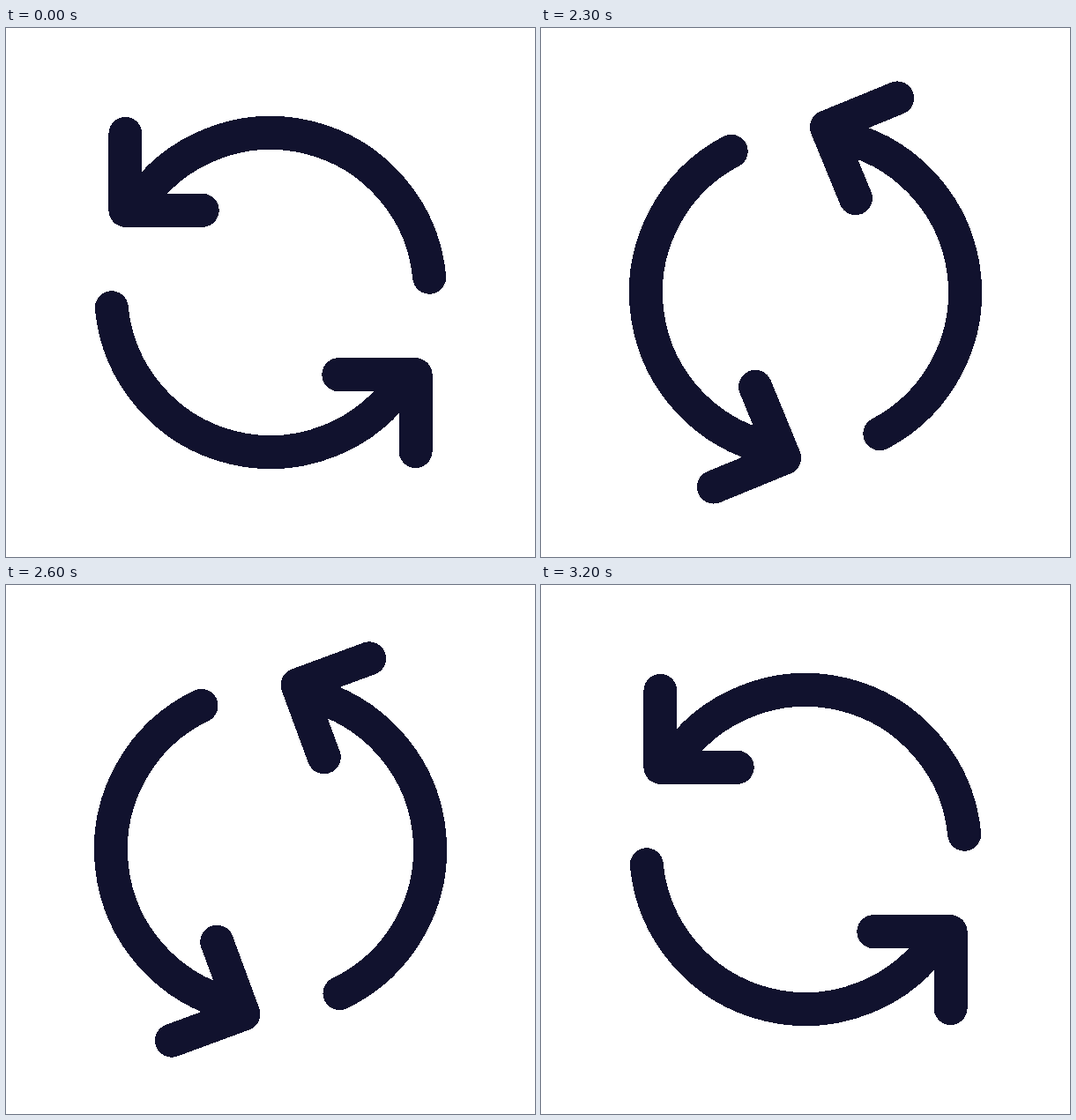
An HTML page that plays this animation: 600x600 px, repeating every 3.26 s.

```html
<!DOCTYPE html>
<html lang="en">
<head>
<meta charset="utf-8">
<title>Refresh arrows</title>
<style>
  html, body { margin: 0; height: 100%; overflow: hidden; background: #fff; }
  svg { display: block; width: 100%; height: 100%; }
</style>
</head>
<body>
<svg viewBox="0 0 600 600" shape-rendering="crispEdges">
  <g id="icon" fill="none" stroke="#11122e" stroke-width="38" stroke-linecap="round" stroke-linejoin="round">
    <path id="arrow" d="M480.2 282.7A181 181 0 0 0 148.2 201.4M135.4 120V206.8H222.7"/>
    <use href="#arrow" transform="rotate(180 300 300)"/>
  </g>
</svg>
<script>
const LOOP = 3260, START = 2016, DURATION = 1184, STEP = 30;
const icon = document.getElementById('icon');

// Cubic Bezier easing with control points (x1, 0) and (x2, 1)
function ease(x, x1 = 0.34, x2 = 0.149) {
  let low = 0, high = 1;
  for (let i = 0; i < 30; i++) {
    const s = (low + high) / 2, r = 1 - s;
    if (3 * s * r * r * x1 + 3 * s * s * r * x2 + s ** 3 < x) low = s;
    else high = s;
  }
  return low * low * (3 - 2 * low);
}

function draw(now) {
  const time = Math.floor((now % LOOP - 2000) / STEP) * STEP + 2000;
  const progress = Math.min(1, Math.max(0, (time - START) / DURATION));
  const turn = progress === 1 ? 0 : -360 * ease(progress);
  icon.setAttribute('transform', `rotate(${turn.toFixed(3)} 300 300)`);
}

const begin = performance.now();
function tick() {
  draw(performance.now() - begin);
  requestAnimationFrame(tick);
}
tick();
</script>
</body>
</html>
```
